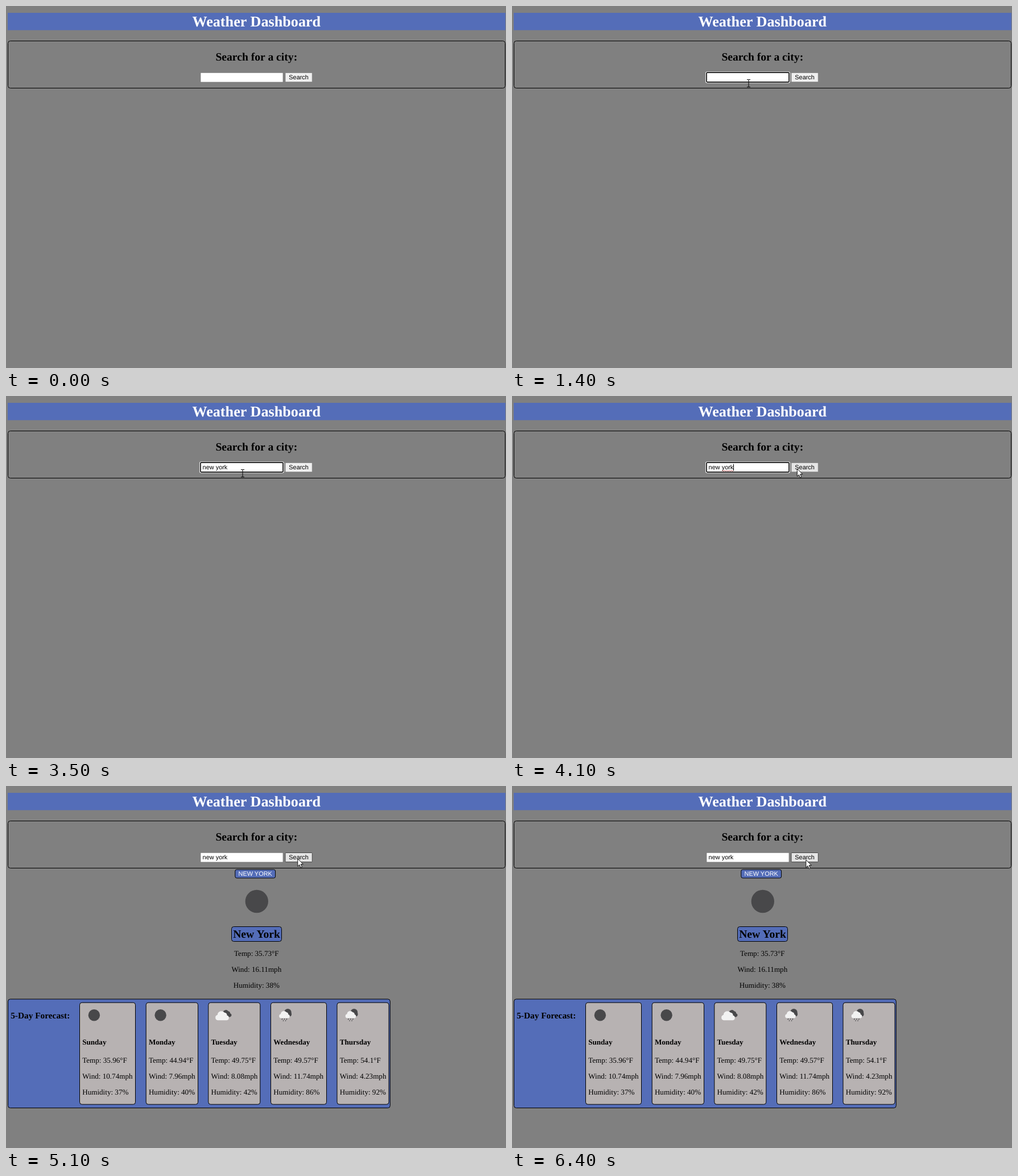
These frames come from a looping animation (879 by 637 pixels, 7.2 s). An HTML page:

```html
<!DOCTYPE html>
<html lang="en">
<head>
<meta charset="utf-8">
<title>Weather Dashboard</title>
<style>
  html, body { margin: 0; width: 100%; height: 100%; overflow: hidden; background: #808080; }
  svg { display: block; width: 879px; height: 637px; }
  text { font-family: "Liberation Serif", "Times New Roman", serif; font-size: 13.12px; white-space: pre; text-rendering: geometricPrecision; }
  .sans { font-family: "Liberation Sans", Arial, sans-serif; font-size: 10.93px; }
  .bold { font-weight: bold; }
  .mid { text-anchor: middle; }
  .h1 { font-size: 26.2px; fill: #fff; }
  .h2 { font-size: 19.65px; }
  .h3 { font-size: 15.35px; }
  .blue { fill: #546db8; }
  .edge { stroke: #000; stroke-width: 1; }
  .card { fill: #b7b2b2; }
  .dark { fill: #48484a; }
  .pale { fill: #f2f2f2; }
</style>
</head>
<body>
<svg viewBox="0 0 879 637" xmlns="http://www.w3.org/2000/svg">
  <defs>
    <path id="cloud" d="M5 18 A4.8 4.8 0 0 1 4.6 8.6 A7 7 0 0 1 17 4.6 A5 5 0 0 1 21.4 9.6 A4.3 4.3 0 0 1 21 18 Z"/>
    <g id="moon"><circle class="dark" cx="21" cy="22" r="10.2"/></g>
    <g id="cloudy">
      <use href="#cloud" class="dark" transform="translate(17.4 11.4) scale(.77)"/>
      <use href="#cloud" class="pale" transform="translate(7 13)"/>
    </g>
    <g id="rain">
      <circle class="dark" cx="25.5" cy="17" r="6.2"/>
      <circle class="dark" cx="28.2" cy="20.2" r="4"/>
      <use href="#cloud" class="pale" transform="translate(9.5 13.2) scale(.79)"/>
      <path d="M16 28l-1 2M20 28l-1 2M24 28l-1 2M18 31l-.7 1.5M22 31l-.7 1.5" stroke="#48484a" stroke-width="1.3"/>
    </g>
  </defs>

  <rect width="879" height="637" fill="#808080"/>
  <rect class="blue" x="3" y="12" width="875" height="30.5"/>
  <text class="h1 bold mid" x="440.3" y="36">Weather Dashboard</text>
  <rect class="edge" x="3.5" y="61.5" width="874" height="83" rx="4" fill="none"/>
  <text class="h2 bold mid" x="440.3" y="96">Search for a city:</text>

  <rect x="342" y="117.3" width="145" height="16.7" fill="#fff" stroke="#777" stroke-width=".7"/>
  <g id="ring">
    <rect x="340.2" y="115.4" width="148.6" height="20.2" rx="2.5" fill="#fff"/>
    <rect x="342" y="117.2" width="145" height="16.6" rx="1.2" fill="#fff" stroke="#101010" stroke-width="1.7"/>
  </g>
  <text id="query" class="sans" x="345.6" y="129.4"></text>
  <path id="wave" fill="none" stroke="#b43c3c" stroke-width=".9"/>
  <path id="caret" stroke="#000" stroke-width="1"/>
  <rect id="button" x="491" y="117.5" width="47.3" height="16.2" rx="1"/>
  <text class="sans mid" x="514.6" y="129.4">Search</text>

  <g id="results">
    <rect class="blue edge" x="402.8" y="147" width="70.8" height="15" rx="3"/>
    <text class="sans mid" x="438.2" y="158.3" fill="#fff">NEW YORK</text>
    <circle class="dark" cx="440.8" cy="203" r="20.2"/>
    <rect class="blue edge" x="396.5" y="247.5" width="88" height="26" rx="4"/>
    <text class="h2 bold mid" x="440.5" y="267">New York</text>
    <text class="mid" x="440.3" y="299">Temp: 35.73°F</text>
    <text class="mid" x="440.3" y="327">Wind: 16.11mph</text>
    <text class="mid" x="440.3" y="355">Humidity: 38%</text>
    <rect class="blue edge" x="3.5" y="375" width="671.8" height="191.5" rx="4"/>
    <text class="h3 bold" x="8.2" y="409">5-Day Forecast:</text>
    <g id="cards"></g>
  </g>

  <path id="arrow" d="M0 0V13.4L3.1 10.5 5.3 15.6 7.6 14.6 5.4 9.6H9.6Z" fill="#fff" stroke="#111" stroke-width="1"/>
  <path id="beam" d="M-3 -6.5H-.8L0 -5.8 .8 -6.5H3M0 -5.8V5.8M-3 6.5H-.8L0 5.8 .8 6.5H3" fill="none" stroke="#111" stroke-width="1.1"/>
</svg>
<script>
const LOOP = 7200, STEP = 100;
const FOCUS = 900, BLUR = 4400, MARKED = 3700, LOADED = 5100;
const QUERY = "new york";
const KEY_TIMES = [1800, 2000, 2100, 2300, 2600, 2700, 2900, 3000];
// Pointer path: time, x, y
const POINTER = [
  [0, 446, 660], [800, 416, 136], [3600, 416, 136], [4100, 501.3, 128],
  [4400, 512.8, 128], [5800, 512.8, 128], [6200, 516.8, 130], [LOOP, 516.8, 130]
];
const DAYS = [
  ["Sunday", "35.96", "10.74", 37, "moon", 129.5, 98],
  ["Monday", "44.94", "7.96", 40, "moon", 246.2, 91.3],
  ["Tuesday", "49.75", "8.08", 42, "cloudy", 355.8, 91],
  ["Wednesday", "49.57", "11.74", 86, "rain", 465.5, 98],
  ["Thursday", "54.1", "4.23", 92, "rain", 582, 91]
];

const $ = id => document.getElementById(id);
const show = (id, on) => $(id).setAttribute("visibility", on ? "visible" : "hidden");

function card([day, temp, wind, humidity, icon, x, width]) {
  const line = (y, text, cls = "") => `<text class="${cls}" x="4.7" y="${y}">${text}</text>`;
  return `<g transform="translate(${x} 381.2)">
    <rect class="card edge" width="${width}" height="179" rx="4"/>
    <use href="#${icon}" x="4.4"/>
    ${line(74, day, "bold")}
    ${line(106, `Temp: ${temp}°F`)}
    ${line(134, `Wind: ${wind}mph`)}
    ${line(162, `Humidity: ${humidity}%`)}
  </g>`;
}

function pointerAt(t) {
  const i = Math.max(1, POINTER.findIndex(p => p[0] >= t));
  const [t0, x0, y0] = POINTER[i - 1], [t1, x1, y1] = POINTER[i];
  const u = (t - t0) / (t1 - t0), k = u * (2 - u);
  return [x0 + (x1 - x0) * k, y0 + (y1 - y0) * k];
}

function drawPointer(t) {
  const [x, y] = pointerAt(t);
  const overInput = x > 341 && x < 488 && y < 137;
  for (const id of ["arrow", "beam"]) $(id).setAttribute("transform", `translate(${x} ${y})`);
  show("arrow", !overInput);
  show("beam", overInput);
  return x > 490 && x < 539 && y < 135;
}

function drawInput(t) {
  const focused = t >= FOCUS && t < BLUR;
  const typed = KEY_TIMES.filter(k => k <= t);
  const query = $("query");
  query.textContent = QUERY.slice(0, typed.length);
  const end = 345.8 + (typed.length ? query.getComputedTextLength() : 0);
  const sinceKey = t - (typed.length ? typed[typed.length - 1] : FOCUS);
  $("caret").setAttribute("d", `M${end} 119.7V131.6`);
  show("caret", focused && sinceKey % 1000 < 500);
  show("ring", focused);
  show("wave", t >= MARKED && t < BLUR);
}

function drawButton(hover, clicked) {
  const button = $("button");
  button.setAttribute("fill", hover ? "#e5e5e5" : "#efefef");
  button.setAttribute("stroke", clicked ? "#444" : "#777");
  button.setAttribute("stroke-width", clicked ? 1 : .7);
}

function draw(time) {
  const t = Math.floor(time % LOOP / STEP) * STEP;
  drawInput(t);
  drawButton(drawPointer(t), t >= BLUR);
  show("results", t >= LOADED);
}

$("cards").innerHTML = DAYS.map(card).join("");
$("wave").setAttribute("d", "M368.8 131.6" + "q1 -1.2 2 0t2 0".repeat(5));

const start = performance.now();
function tick() {
  draw(performance.now() - start);
  requestAnimationFrame(tick);
}
tick();
</script>
</body>
</html>
```
